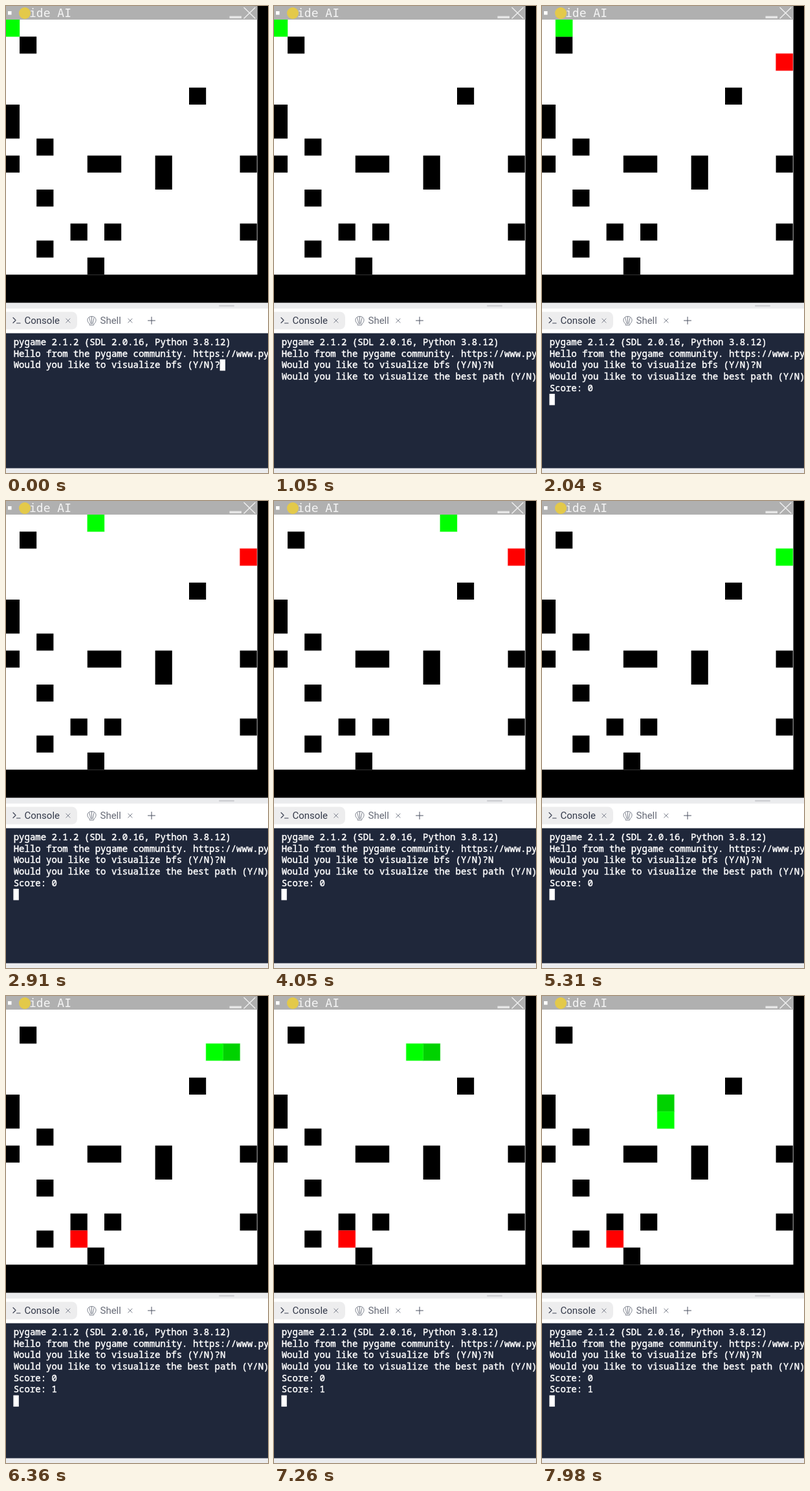
Write an HTML page that moves like this. It is 405x720 px and loops after 8000 ms.

```html
<!DOCTYPE html>
<html lang="en">
<head>
<meta charset="utf-8">
<title>Grid game</title>
<style>
  html, body { margin: 0; width: 100%; height: 100%; overflow: hidden; background: #000; }
  svg { display: block; width: 405px; height: 720px; }
  .mono { font: 500 14px "Noto Sans Mono", "DejaVu Sans Mono", monospace; fill: #fff; stroke: #fff; stroke-width: 0.45; }
  .tab { font: 15px Roboto, Inter, sans-serif; fill: #343a4a; }
  .title { font: 18px "DejaVu Sans Mono", monospace; fill: #f4f4f4; }
  .line { fill: none; stroke-linecap: round; stroke-linejoin: round; }
  .soft { stroke-opacity: 0.25; stroke-width: 1.4; }
</style>
</head>
<body>
<svg viewBox="0 0 405 720">
  <rect width="405" height="720" fill="#000"/>

  <rect width="388.5" height="414.2" fill="#fff"/>
  <g id="board"></g>
  <rect width="388.5" height="21" fill="#b0b0b0"/>
  <rect x="3" y="8" width="5.5" height="5.5" fill="#fff"/>
  <text class="title" x="36" y="17">ide AI</text>
  <circle cx="29" cy="11" r="9" fill="#e3c94a"/>
  <rect x="345.5" y="15.5" width="18.5" height="3.5" fill="#e6e6e6"/>
  <path class="line" d="M368 2.5 385 19M385 2.5 368 19" stroke="#f0f0f0" stroke-width="1.4"/>

  <rect y="457.5" width="405" height="9.5" fill="#ebecee"/>
  <rect x="329" y="461" width="24" height="2.5" rx="1.2" fill="#cfd0d4"/>
  <rect y="466.5" width="405" height="39" fill="#fff"/>
  <rect x="-10" y="471.5" width="120" height="27" rx="8" fill="#ededee"/>
  <path class="line" d="M11 480.5 15 484.5 11 488.5M16.5 489H22" stroke="#3f4555" stroke-width="1.2"/>
  <text class="tab" x="28.5" y="490">Console</text>
  <text class="tab" x="145.5" y="490" fill-opacity="0.75">Shell</text>
  <g class="line" stroke="#7b808c" stroke-width="1">
    <path d="M92.8 482 99 488.2M99 482 92.8 488.2M188.8 482 195 488.2M195 482 188.8 488.2"/>
    <path d="M129 490C124 486 125 479 132.5 478.5C140 479 141 486 136 490L135.5 492H129.5ZM131 490 129 481M132.5 490V479M134 490 136 481"/>
    <path d="M219.5 485H230.5M225 479.5V490.5" stroke="#4b5160"/>
  </g>

  <rect y="504.5" width="405" height="208.5" fill="#1f273a"/>
  <rect y="712.6" width="405" height="7.4" fill="#ebecee"/>
  <g id="console" class="mono"></g>
  <rect id="cursor" width="8.4" height="17.5" fill="#fff"/>
</svg>
<script>
const LOOP = 8000, CELL = 26.2, CHAR = 8.4, ROW = 17.7;
const EATEN = 5310, RESTART = 6090, TO_FOOD = 16;
const NS = "http://www.w3.org/2000/svg";
const board = document.getElementById("board");
const consoleBox = document.getElementById("console");
const cursor = document.getElementById("cursor");

function add(parent, tag, attrs) {
  const node = document.createElementNS(NS, tag);
  for (const key in attrs) node.setAttribute(key, attrs[key]);
  return parent.appendChild(node);
}

function place(node, [col, row]) {
  node.setAttribute("x", 21 + CELL * (col - 1));
  node.setAttribute("y", 21 + CELL * row);
}

function show(node, visible) {
  node.setAttribute("visibility", visible ? "visible" : "hidden");
}

function wall(col, row, cols = 1, rows = 1) {
  place(add(board, "rect", { width: CELL * cols, height: CELL * rows }), [col, row]);
}

function piece(color) {
  return add(board, "rect", { class: "soft", width: CELL, height: CELL, fill: color, stroke: color });
}

wall(1, 1);
wall(11, 4);
wall(0, 5, 1, 2);
wall(0, 8);
wall(5, 8, 2, 1);
wall(9, 8, 1, 2);
wall(5, 14);
for (let row = 7; row <= 13; row += 3) wall(2, row);
for (const col of [4, 6, 14]) wall(col, 12);
wall(14, 8);
const food = piece("#f00");
const tail = piece("#00d200");
const head = piece("#0f0");

// Corners of the route, walked one cell per step
const corners = [[0, 0], [14, 0], [14, 2], [7, 2], [7, 6]];
const route = [corners[0]];
for (const [col, row] of corners.slice(1)) {
  let [x, y] = route[route.length - 1];
  while (x !== col || y !== row) {
    x += Math.sign(col - x);
    y += Math.sign(row - y);
    route.push([x, y]);
  }
}

// A steady walk to the first food, then one that quickens near its end
function stepTime(n) {
  if (n <= TO_FOOD) return EATEN - 222 * (TO_FOOD - n);
  const k = n - TO_FOOD - 1;
  return RESTART + 225 * k - 0.0361 * k ** 4;
}

function stepAt(t) {
  let n = 0;
  while (n + 1 < route.length && stepTime(n + 1) <= t) n++;
  return n;
}

const question = what => `Would you like to visualize ${what} (Y/N)?`;
const output = [
  [0, "pygame 2.1.2 (SDL 2.0.16, Python 3.8.12)\n"],
  [0, "Hello from the pygame community. https://www.pygame.org/contribute.html\n"],
  [0, question("bfs")],
  [510, "N"],
  [810, "\n" + question("the best path")],
  [1470, "\n"],
  [1680, "Score: 0\n"],
  [5820, "Score: 1\n"]
];
const rows = Array.from({ length: 7 }, (_, i) =>
  add(consoleBox, "text", { x: 11.7, y: 522.8 + ROW * i }));

function renderConsole(t) {
  const lines = output.filter(([time]) => time <= t).map(([, text]) => text).join("").split("\n");
  rows.forEach((node, i) => { node.textContent = lines[i] || ""; });
  const last = lines.length - 1;
  cursor.setAttribute("x", 11.4 + CHAR * lines[last].length);
  cursor.setAttribute("y", 509.4 + ROW * last);
}

function render(t) {
  const step = stepAt(t);
  place(head, route[step]);
  show(tail, step > TO_FOOD);
  place(tail, route[Math.max(0, step - 1)]);

  const second = t >= 5640;
  place(food, second ? [4, 13] : [14, 2]);
  show(food, second || (t >= 1500 && t < EATEN));
  renderConsole(t);
}

const begin = performance.now();
function frame() {
  render((performance.now() - begin) % LOOP);
  requestAnimationFrame(frame);
}
frame();
</script>
</body>
</html>
```
